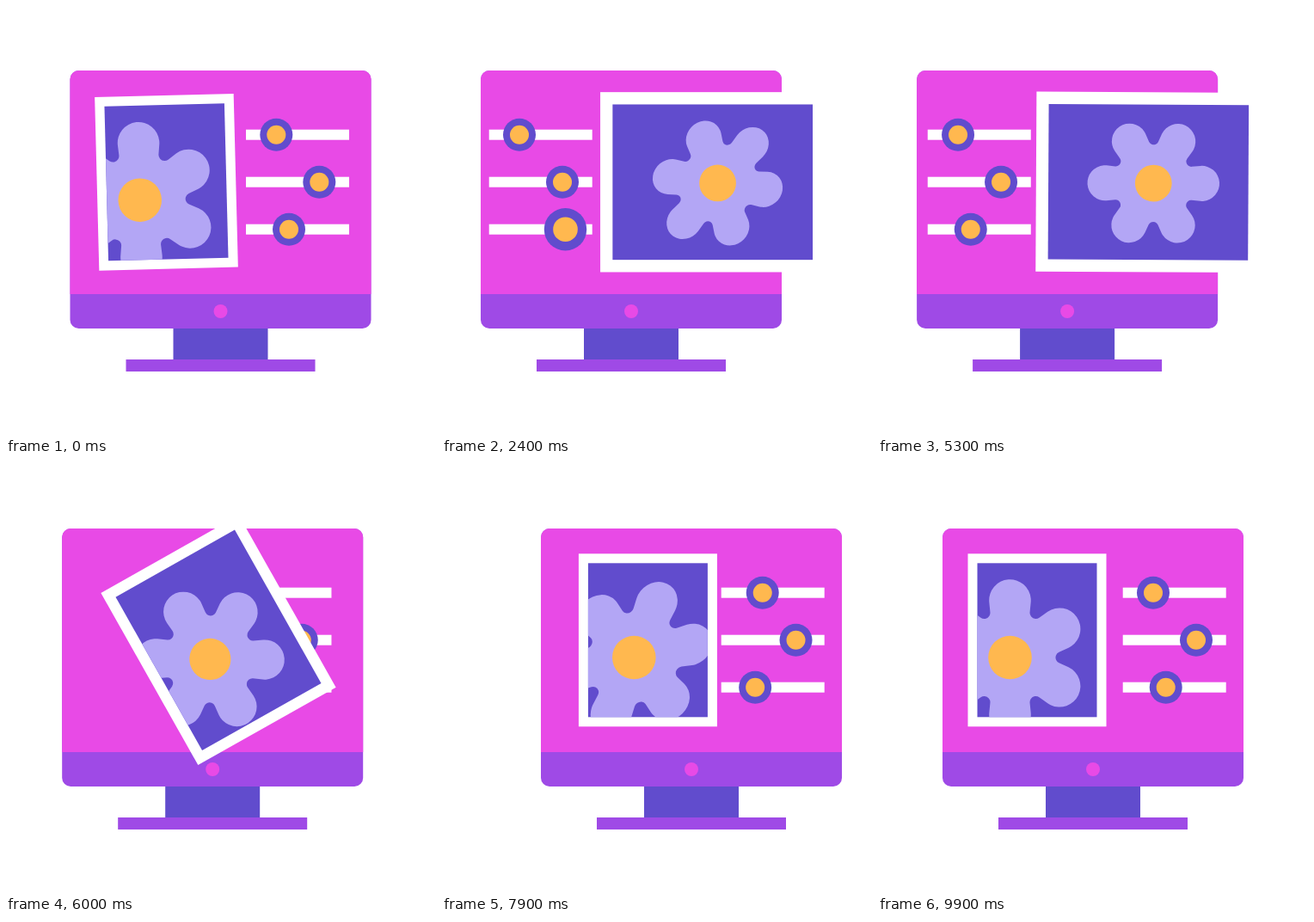
Write an HTML page with a canvas that moves like this. It is 500 px wide and 500 px high and loops after 10000 ms.

```html
<!DOCTYPE html>
<html>
<head>
<meta charset="utf-8">
<style>
html, body { margin: 0; width: 100%; height: 100%; overflow: hidden; background: #fff; }
canvas { display: block; width: 500px; height: 500px; }
</style>
</head>
<body>
<canvas id="stage"></canvas>
<script>
const LOOP = 10000, LEAD = 90, RAD = Math.PI / 180, TAU = 2 * Math.PI;
const PINK = '#e84ae6', VIOLET = '#9f4ae6', INDIGO = '#614ccd',
      LILAC = '#b3a6f5', GOLD = '#ffb84f', WHITE = '#fff';

const canvas = document.getElementById('stage');
const dpr = window.devicePixelRatio || 1;
canvas.width = canvas.height = 500 * dpr;
const c = canvas.getContext('2d');

const mix = (a, b, k) => a + (b - a) * k;
const part = (t, a, span) => Math.min(1, Math.max(0, (t - a) / span));

// Eased step from 0 to 1
function ramp(t, a, span) {
  const p = part(t, a, span);
  return p * p * (3 - 2 * p);
}

// 0 to 1 and back, without a hold
const hump = (t, a, span) => Math.sin(Math.PI * part(t, a, span)) ** 2;

// 0 = portrait layout, 1 = landscape layout
const layout = (t, back, span) => ramp(t, 0, span) - ramp(t, back, span);

// The knobs are dragged one after another
const dragStart = n => 1110 + 1100 * n;
const drag = (t, n) => ramp(t, dragStart(n) + 60, 340) - ramp(t, dragStart(n) + 800, 360);
const grip = (t, n) => 1 + 0.3 * (ramp(t, dragStart(n), 150) - ramp(t, dragStart(n) + 1050, 150));

// Knobs overshoot after the layout change, then swing three times with the shake
const loose = (t, i) =>
  18.5 * hump(t, 6350 + 80 * i, 750) + 16.8 * Math.sin(3 * TAU * part(t, 6968 + 110 * i, 2700));

function rect(x, y, w, h, fill) {
  c.fillStyle = fill;
  c.fillRect(x, y, w, h);
}

function disc(x, y, r, fill) {
  c.fillStyle = fill;
  c.beginPath();
  c.arc(x, y, r, 0, TAU);
  c.fill();
}

function panel(h, corners, fill) {
  c.fillStyle = fill;
  c.beginPath();
  c.roundRect(0, 0, 350, h, corners);
  c.fill();
}

function monitor(x) {
  c.save();
  c.translate(x, 75);
  rect(120, 299, 110, 38, INDIGO);
  rect(65, 336, 220, 14, VIOLET);
  panel(300, 10, VIOLET);
  panel(260, [10, 10, 0, 0], PINK);
  disc(175, 280, 8, PINK);
  c.restore();
}

function slider(x, y, value, scale) {
  rect(x, y - 6, 120, 12, WHITE);
  disc(x + value, y, 19 * scale, INDIGO);
  disc(x + value, y, 11 * scale, GOLD);
}

function petals() {
  const tip = 94.5 * RAD, gap = 64.5 * RAD;
  c.beginPath();
  for (let i = 0; i < 6; i++) {
    const a = (i * 60 + 30) * RAD, n = a + 30 * RAD;
    c.arc(66.5 * Math.cos(a), 66.5 * Math.sin(a), 24.3, a - tip, a + tip);
    c.arc(60 * Math.cos(n), 60 * Math.sin(n), 7, n + Math.PI + gap, n + Math.PI - gap, true);
  }
  c.closePath();
  c.fillStyle = LILAC;
  c.fill();
}

function draw(ms) {
  const t = (ms + LEAD) % LOOP;
  const turn = layout(t, 5350, 1200) * -90 * RAD;
  const move = layout(t, 5350, 1440);
  const shake = 40 * (ramp(t, 7000, 600) - 2 * ramp(t, 8000, 700) + ramp(t, 8880, 620));
  const roll = 0.385 * shake + 6 * hump(t, 6450, 700);
  const zoom = drag(t, 0), spin = drag(t, 1), shift = 48 * drag(t, 2);

  c.setTransform(dpr, 0, 0, dpr, 0, 0);
  rect(0, 0, 500, 500, WHITE);
  monitor(75 - 30 * layout(t, 5350, 1200) + shake);

  const values = [35.3 + shift, 85.3 - 65 * zoom, 50 + 54 * spin];
  values.forEach((v, i) => {
    const x = 284.7 - 230 * layout(t, 5325, 970) + shake;
    slider(x, 149.7 + 55 * i, v + loose(t, i), grip(t, (i + 2) % 3));
  });

  // Picture
  c.save();
  c.translate(185 + 129.7 * move + 1.36 * shake, 204.8);
  c.rotate(turn);
  c.scale(1 + 0.3 * move, 1 + 0.3 * move);
  rect(-80.5, -100.5, 161, 201, WHITE);
  rect(-69.5, -89.5, 139, 179, INDIGO);
  c.beginPath();
  c.rect(-69.5, -89.5, 139, 179);
  c.clip();

  // Flower, leaning sideways as it turns
  c.translate(mix(-31.5, -0.9, move) + roll, mix(20.2, 4.5, move) + shift / 1.3);
  const bloom = mix(1, 0.65, move) * (1 - 0.4 * zoom);
  c.scale(bloom, bloom);
  c.save();
  c.rotate(-turn);
  c.transform(1, 0, -0.0069 * roll - 0.14 * spin, 1, 0, 0);
  c.rotate(turn + (1.1 * roll + 10.5 * spin) * RAD);
  petals();
  c.restore();
  disc(0, 0, 25.3, GOLD);
  c.restore();
}

const start = performance.now();
function tick() {
  draw(performance.now() - start);
  requestAnimationFrame(tick);
}
tick();
</script>
</body>
</html>
```
